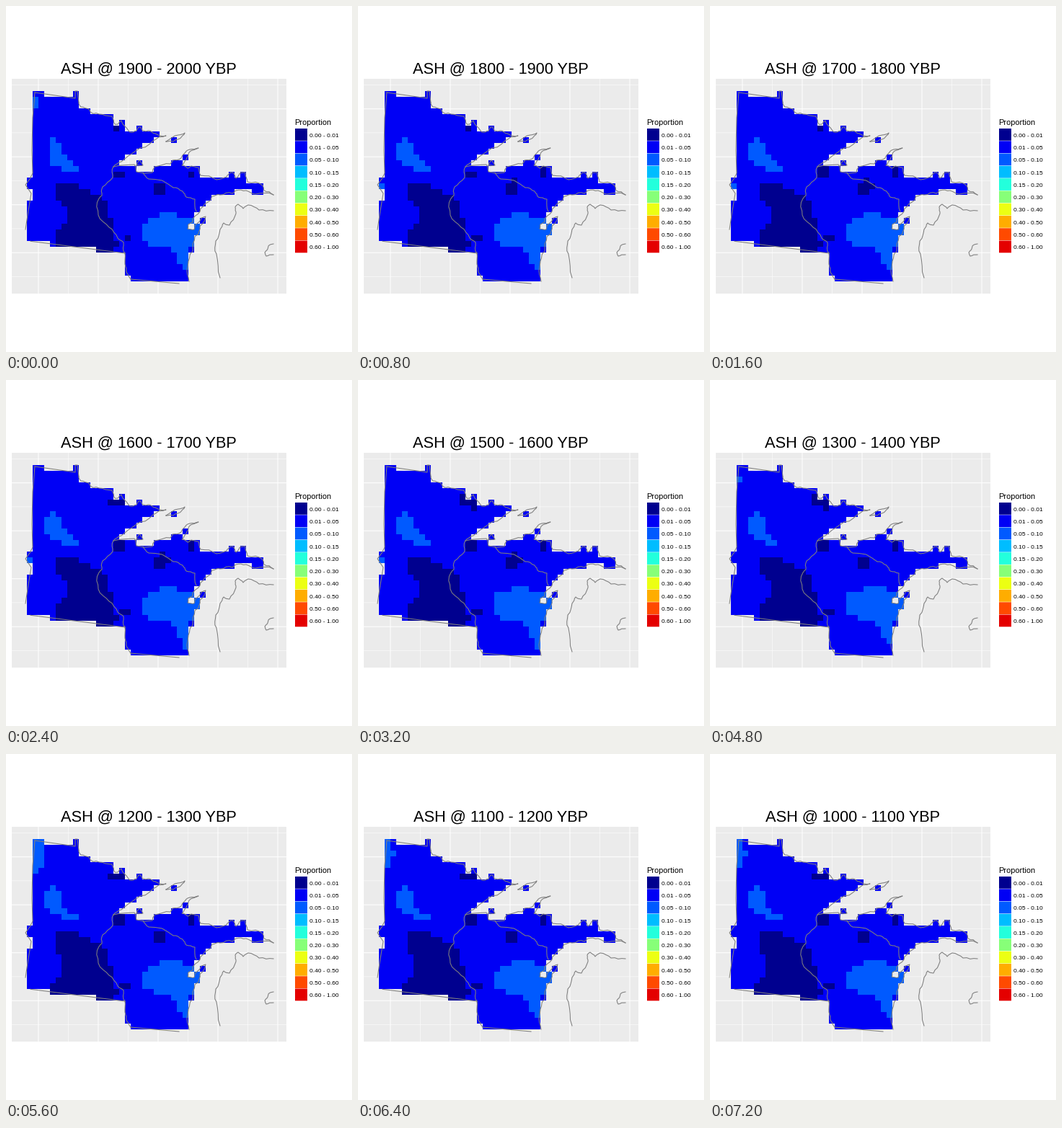
A matplotlib script that plays this animation: 480x480 px, repeating every 8000 ms.

```python
import numpy as np
import matplotlib.pyplot as plt
from matplotlib.animation import FuncAnimation
from matplotlib.colors import ListedColormap
from matplotlib.patches import Rectangle
from matplotlib.path import Path

SIZE, DPI = 480, 72          # at 72 dpi one point is one pixel
CELL, X0, Y0 = 8, 29, 118
ROWS, COLS = 33, 41
FRAMES, INTERVAL = 10, 800
DARK, BLUE, LIGHT = 0, 1, 2

COLORS = ["#00008F", "#0000F5", "#005AFF", "#00BDFF", "#23FFDC",
          "#87FF78", "#ECFF13", "#FFAD00", "#FF4A00", "#E40000"]
BREAKS = [0, .01, .05, .10, .15, .20, .30, .40, .50, .60, 1]

# Borders and shores in pixels; the land cells follow from them
WEST = [(27, 310), (30, 290), (34, 266), (35, 260), (27, 248), (33, 240),
        (37, 232), (36, 200), (37, 155), (40, 120)]
NORTH = [(40, 120), (89, 127), (96, 128), (96, 118), (99, 118), (101, 134),
         (104, 140), (115, 143), (120, 149), (129, 150), (147, 153),
         (151, 164), (155, 164), (160, 159), (166, 168), (172, 175),
         (181, 173), (184, 168), (187, 168), (190, 173), (197, 173),
         (207, 177), (222, 180), (204, 187), (180, 201), (160, 216),
         (149, 223)]
LAKE = [(149, 223), (178, 220), (181, 230), (203, 231), (206, 223),
        (228, 219), (231, 214), (243, 211), (246, 206), (255, 199),
        (267, 197), (254, 203), (250, 213), (244, 221), (252, 225),
        (257, 222), (267, 224), (270, 235), (292, 241), (306, 237),
        (311, 231), (315, 231), (319, 239), (326, 231), (332, 231),
        (335, 244), (356, 249), (358, 256), (371, 262)]
BAY = [(371, 262), (346, 261), (333, 256), (319, 256), (314, 260),
       (297, 262), (286, 264), (283, 270), (270, 281), (260, 294),
       (259, 300), (253, 303), (252, 309), (261, 310), (262, 304),
       (269, 298), (271, 294), (277, 292), (275, 299), (269, 306),
       (267, 316), (262, 320), (259, 340), (255, 346), (252, 362),
       (254, 382)]
BOTTOM = [(240, 385), (173, 379)]
LOWER_RIVER = [(173, 379), (168, 371), (165, 358), (165, 343)]
SOUTH = [(165, 343), (34, 326.3)]
RIVER = [(149, 223), (148, 238), (134, 251), (133, 263), (129, 267),
         (128, 290), (143, 307), (155, 322), (163, 328), (165, 343)]
INLAND = [(190, 231), (198, 240), (232, 252), (245, 257), (250, 265),
          (262, 268), (264, 285)]
EAST = [(371, 284), (351, 283), (336, 276), (329, 281), (322, 275),
        (318, 279), (319, 288), (310, 304), (302, 301), (297, 310),
        (291, 326), (292, 344), (297, 377)]
EAST_EDGE = [(371, 330), (364, 333), (359, 342), (361, 347), (371, 345)]
LONG_ISLAND = [(222, 188), (239, 179), (248, 176), (244, 181), (232, 188),
               (222, 188)]
SMALL_ISLAND = [(181, 221), (185, 214), (190, 221), (181, 221)]

MAINLAND = WEST + NORTH + LAKE + BAY + BOTTOM + LOWER_RIVER + SOUTH
ROUGH = [NORTH[5:], LAKE, BAY, RIVER, LOWER_RIVER, INLAND, EAST, EAST_EDGE,
         LONG_ISLAND, SMALL_ISLAND]
STRAIGHT = [WEST, NORTH[:6], BOTTOM, SOUTH]

cols, rows = np.meshgrid(np.arange(COLS) + 0.5, np.arange(ROWS) + 0.5)
centres = np.column_stack([cols.ravel(), rows.ravel()])


def inside(shape, points=centres):
    return Path(shape).contains_points(points).reshape(ROWS, COLS)


def roughen(path, rng):
    """Bend every long segment a little at its middle, twice over."""
    pts = np.array(path, float)
    for _ in range(2):
        step = np.diff(pts, axis=0)
        bend = rng.uniform(-0.12, 0.12, (len(step), 1))
        mid = pts[:-1] + step / 2 + step[:, ::-1] * [-1, 1] * bend
        out = np.empty((2 * len(pts) - 1, 2))
        out[::2], out[1::2] = pts, mid
        pts = out
    return pts


def dark_mask(step):
    wide = step >= 7
    shoulder = 5 if step >= 4 else 6
    waist, foot, hip = (6, 4, 25) if wide else (7, 5, 24)
    mask = inside([(shoulder, 16), (8, 16), (13, 18.5), (14, 19.5), (14, 21),
                   (15, 22.5), (15, 26), (16, 26), (16, 27), (15, 27),
                   (15, 28), (12, 28), (12, 27), (foot, 27), (foot, hip),
                   (waist, hip - 1), (waist, 20), (5, 19), (5, 17)])
    mask[25, 16 if step else 17:18] = True
    mask[13 if step >= 2 else 14:15, 15:17] = True
    mask[13 if step >= 1 else 14:15, 28] = True
    # northern shore
    mask[6, slice(14, 17) if step >= 3 else 15] = True
    if 4 <= step <= 6:
        mask[5, 14] = mask[7, 16] = True
    # central patch
    mask[16:18, 22:24] = True
    mask[15, 23] |= 1 <= step <= 5
    mask[16, 24] |= 2 <= step <= 5
    return mask


def light_mask(step):
    top = 27 if step >= 5 else 26
    left = 20 if 4 <= step <= 6 else 21
    heel = 23.5 if step >= 6 else 22
    tail = 32 if step in (3, 4) else 31
    mask = inside([(23, 21), (top, 21), (top, 22), (30, 22), (30, 25),
                   (29, 25), (29, 27), (28, 27), (28, tail), (27, tail),
                   (27, 30), (26, 30), (26, 28), (25, 28), (25, 27),
                   (heel, 27), (20, 26), (20, 23), (left, 23), (left, 22),
                   (23, 22)])
    # western streak
    side = 3 if step else 4
    neck = 11 if step < 6 else 12
    tip = 8 if step == 6 else 8.9
    mask |= inside([(4, 8), (5, 8), (5, 9), (6, 9), (6, neck), (tip, 13),
                    (tip, 14), (6, 14), (6, 13), (4, 13), (4, 12),
                    (side, 12), (side, 9), (4, 9)])
    # north-western corner
    if step == 0:
        mask[1:3, 1] = True
    elif step == 6:
        mask[2, 1] = True
    elif step >= 7:
        mask[0:5, 1:3 if step == 7 else 2] = True
        mask[2, 2] = True
        mask[5, 1] = step == 7
    mask[16, 0] |= 1 <= step <= 5
    return mask


def levels_at(step):
    grid = np.full((ROWS, COLS), BLUE)
    grid[light_mask(step)] = LIGHT
    grid[dark_mask(step)] = DARK
    return np.ma.masked_array(grid, ~land)


def box(x, y, w, h, color):
    ax.add_patch(Rectangle((x, y), w, h, fc=color, lw=0, snap=False))


def line(points, color, width, z):
    ax.plot(*zip(*points), color=color, lw=width, zorder=z, snap=False)


def label(x, y, text, size, **kw):
    return ax.text(x, y, text, fontsize=size, family="Liberation Sans",
                   color="black", va="baseline", **kw)


def draw_panel():
    box(8, 101, 381, 298, "#EBEBEB")
    for shift, width in ((0, 1.07), (41.5, 0.53)):
        for x in np.arange(45 + shift, 389, 83):
            line([(x, 101), (x, 399)], "white", width, 2)
    for start, width in ((142.7, 1.07), (109.4, 0.53)):
        for y in np.arange(start, 399, 66.5):
            line([(8, y), (389, y)], "white", width, 2)
    rng = np.random.default_rng(4)
    for path in STRAIGHT + [roughen(p, rng) for p in ROUGH]:
        line(path, "#7F7F7F", 1.07, 4)


def draw_legend():
    label(400.5, 165, "Proportion", 11)
    key = 17.28
    for i, color in enumerate(COLORS):
        y = 170 + key * i
        box(401, y, 17, key - 0.5, color)
        label(421, y + 11.8, f"{BREAKS[i]:.2f} - {BREAKS[i + 1]:.2f}", 8.4)


fig = plt.figure(figsize=(SIZE / DPI, SIZE / DPI), dpi=DPI, facecolor="white")
ax = fig.add_axes([0, 0, 1, 1])
pixels = centres * CELL + [X0, Y0]
land = (inside(MAINLAND, pixels) | inside(LONG_ISLAND, pixels)
        | inside(SMALL_ISLAND, pixels))
tiles = ax.imshow(levels_at(0), cmap=ListedColormap(COLORS), vmin=-0.5,
                  vmax=9.5, interpolation="nearest", aspect="auto", zorder=3,
                  extent=(X0, X0 + CELL * COLS, Y0 + CELL * ROWS, Y0))
draw_panel()
draw_legend()
title = label(198, 93.5, "", 21.8, ha="center")
ax.set_xlim(0, SIZE)
ax.set_ylim(SIZE, 0)
ax.axis("off")


def update(step):
    start = 1900 - 100 * step
    title.set_text(f"ASH @ {start} - {start + 100} YBP")
    tiles.set_data(levels_at(step))
    return tiles, title


anim = FuncAnimation(fig, update, frames=FRAMES, interval=INTERVAL,
                     repeat=True, repeat_delay=0)
plt.show()
```
